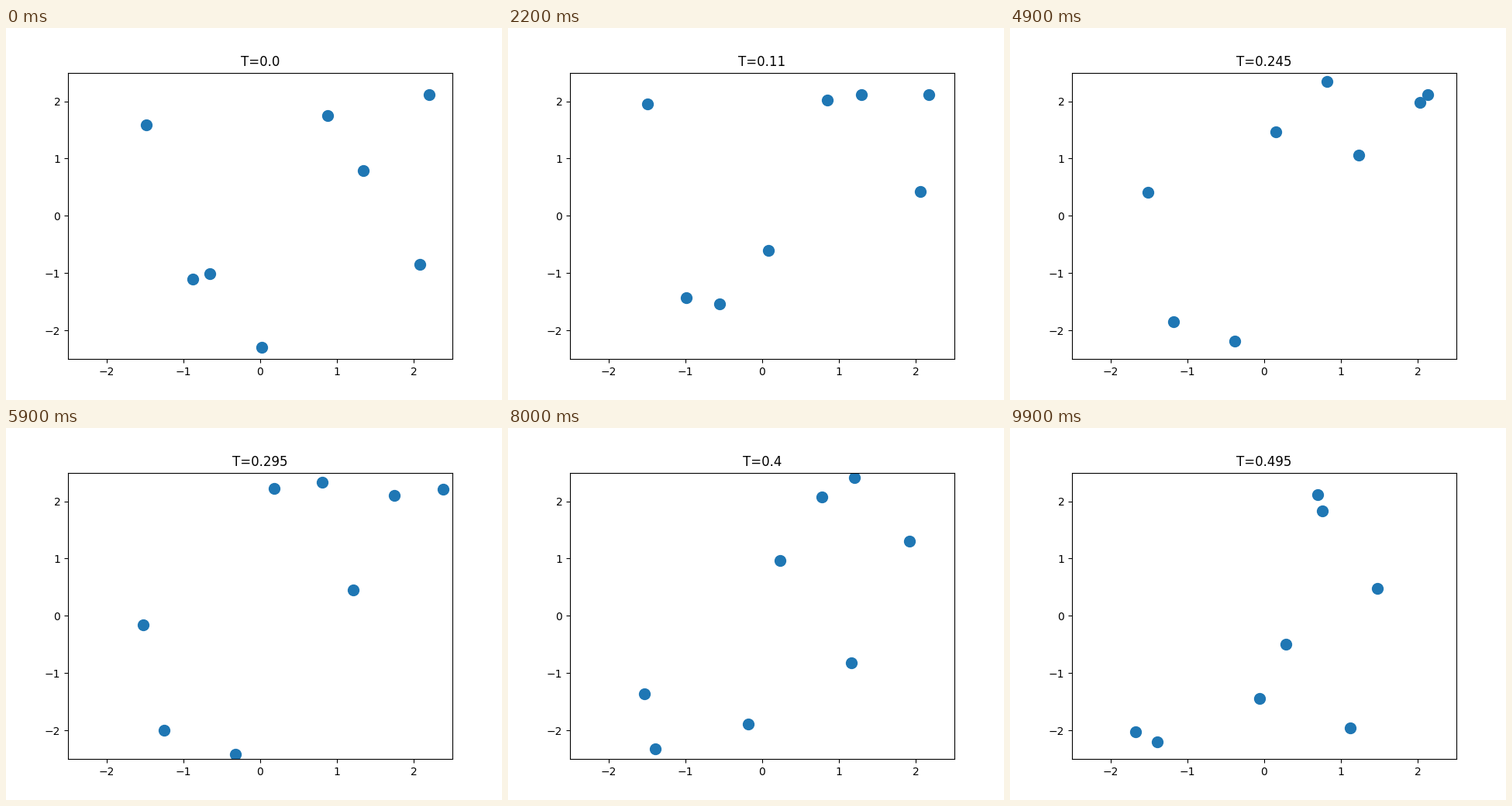
Animation of 640x480 px, one loop 10000 ms. Source, as a matplotlib script:

```python
from itertools import combinations

import matplotlib.pyplot as plt
import numpy as np
from matplotlib.animation import FuncAnimation

plt.rcParams["text.kerning_factor"] = 6     # whole-pixel kerning

FRAMES = 100
DT = 0.005
RADIUS = 0.1
WALL = 2.5 - RADIUS

# starting x, y and velocity of each disc; collisions give the rest
DISCS = np.array([
    (-1.480, 1.588, -0.126, 11.416),
    (-0.878, -1.107, 0.759, -2.558),
    (-0.653, -1.011, -0.867, -5.236),
    (0.016, -2.292, 0.548, 15.314),
    (0.880, 1.751, -0.258, 2.446),
    (1.341, 0.790, -0.448, 12.064),
    (2.1975, 2.115, -0.286, 0.030),
    (2.077, -0.847, -0.204, 11.568),
])


def bounce_walls(pos, vel):
    out = np.abs(pos) > WALL
    pos[out] = 2 * WALL * np.sign(pos[out]) - pos[out]
    vel[out] *= -1


def bounce_pairs(pos, vel):
    """Rewind overlapping discs to first contact, collide, and replay."""
    for i, j in combinations(range(len(pos)), 2):
        d, w = pos[j] - pos[i], vel[j] - vel[i]
        gap, closing, speed2 = d @ d - 4 * RADIUS**2, d @ w, w @ w
        if gap >= 0 or closing >= 0:
            continue
        back = (closing + np.sqrt(closing**2 - speed2 * gap)) / speed2
        normal = (d - w * back) / (2 * RADIUS)
        kick = (w @ normal) * normal
        pos[i] += kick * back
        pos[j] -= kick * back
        vel[i] += kick
        vel[j] -= kick


def simulate():
    pos, vel = np.hsplit(DISCS.copy(), 2)
    path = [pos.copy()]
    for _ in range(FRAMES - 1):
        pos += vel * DT
        path.append(pos.copy())     # shown before collisions are resolved
        bounce_pairs(pos, vel)
        bounce_walls(pos, vel)
    return path


path = simulate()

fig, ax = plt.subplots(figsize=(6.4, 4.8), dpi=100)
ax.set(xlim=(-2.5, 2.5), ylim=(-2.5, 2.5))
dots = ax.scatter(*path[0].T, s=100)
title = ax.set_title("T=0.0")


def update(i):
    dots.set_offsets(path[i])
    title.set_text(f"T={round(i * DT, 3)}")
    return dots, title


anim = FuncAnimation(fig, update, frames=FRAMES, interval=100,
                     repeat=True, repeat_delay=0)
plt.show()
```
